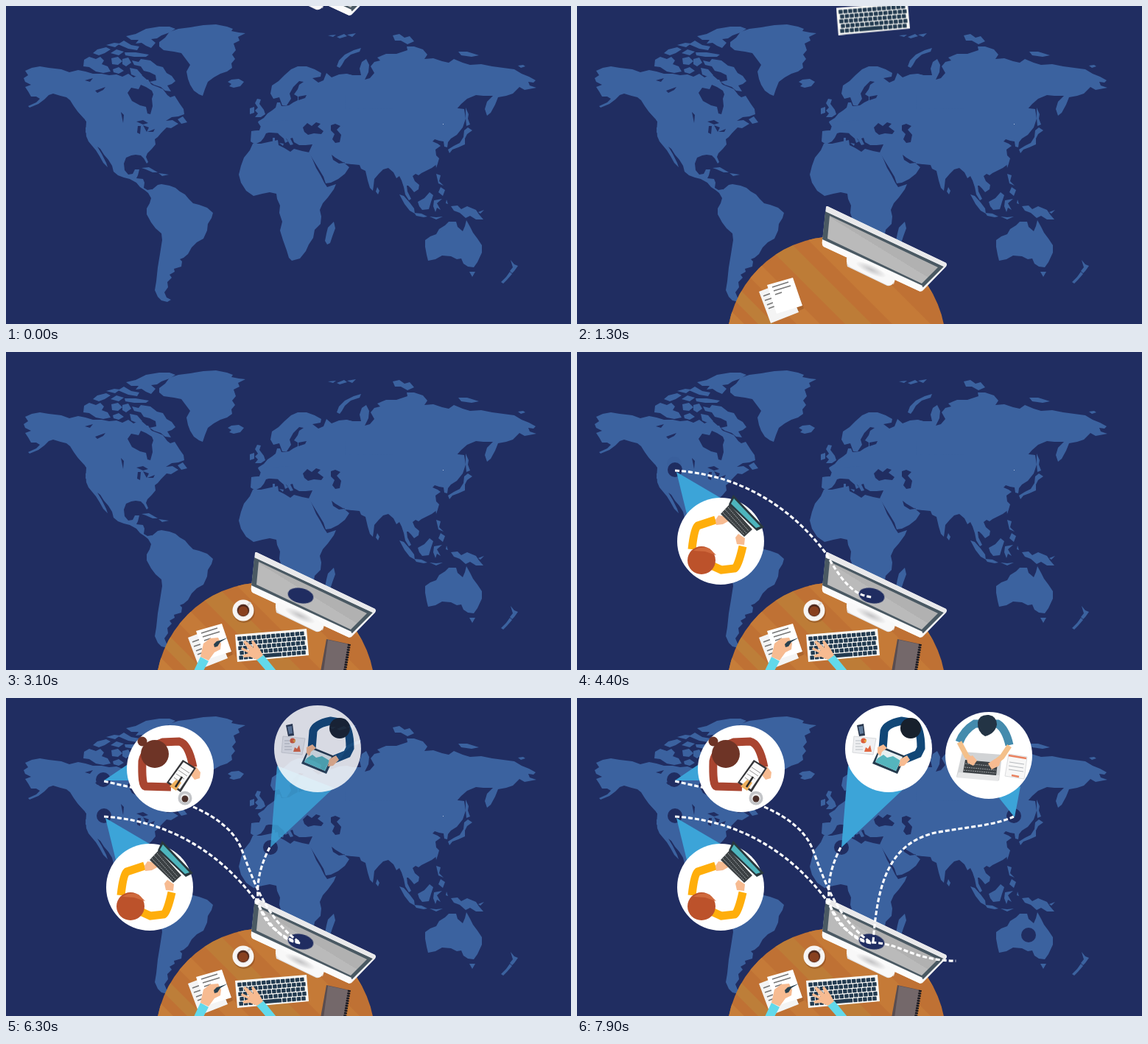
An HTML page that plays this animation: 767 px wide and 432 px high, repeating every 8 s.

```html
<!DOCTYPE html>
<html lang="en">
<head>
<meta charset="utf-8">
<title>Connected desks</title>
<style>
  html, body { margin: 0; width: 100%; height: 100%; overflow: hidden; background: #202d61; }
  svg { display: block; width: 767px; height: 432px; }
  .land { fill: #3b629f; }
  .sea, .marker { fill: #202d61; }
  .line { fill: none; stroke: #fff; stroke-width: 3.1; stroke-dasharray: 6 3; }
  .beam { fill: #3ca4d8; }
  .arm { fill: none; stroke-width: 11; }
  .skin { fill: #f7bb91; }
</style>
</head>
<body>
<svg viewBox="0 0 767 432" xmlns="http://www.w3.org/2000/svg">
  <defs>
    <clipPath id="deskClip"><circle cx="352" cy="462" r="149"/></clipPath>
    <linearGradient id="glass" x1="0" y1="1" x2="1" y2="0">
      <stop offset=".5" stop-color="#bababa"/><stop offset=".5" stop-color="#b1b1b1"/>
    </linearGradient>
    <radialGradient id="standShade">
      <stop offset="0" stop-color="#c4c4c6"/><stop offset="1" stop-color="#f6f6f6"/>
    </radialGradient>
  </defs>

  <g class="land">
    <!-- North America -->
    <path d="M24 98L30 94 26 88 35 84 46 82 58 84 75 86 86 90 98 87 108 89 118 92 130 92 140 94 150 93 158 96 166 92 173 97 183 93 190 99 198 107 206 110 213 113 219 121 223 124 229 122 236 133 241 140 242 147 234 150 225 151 217 156 226 155 234 160 224 166 218 165 211 172 108 172 109 157 103 150 97 143 92 136 87 128 82 124 74 122 64 119 58 121 52 127 44 133 32 138 30 136 41 131 46 126 41 123 34 123 30 116 26 110 34 107 26 103z"/>
    <path d="M108 165L214 165 211 172 206 178 202 181 203 188 198 194 192 200 190 205 193 212 191 214 187 207 183 203 176 202 170 203 163 206 160 214 161 223 166 229 172 228 175 222 181 222 179 230 177 234 186 235 188 240 187 247 192 250 198 249 201 253 197 254 193 254 188 250 182 246 177 240 168 235 160 233 152 230 146 225 144 217 139 209 133 202 128 194 124 191 130 201 136 213 138 219 132 213 127 204 122 196 117 190 112 184 109 177z"/>
    <!-- Arctic islands -->
    <path d="M106 73L113 69 122 72 128 69 133 74 130 79 138 82 142 89 132 91 122 89 113 83 105 82zM118 64L124 59 136 56 142 59 134 64 126 67zM143 71L152 69 158 75 152 80 144 79zM158 72L166 70 170 77 163 82 158 79zM145 86L153 83 160 88 153 92 146 90z"/>
    <path d="M163 41L176 38 190 31 208 28 222 28 230 31 222 36 211 40 205 44 197 45 203 50 197 57 190 54 184 50 176 51 180 46 170 46zM136 53L147 50 155 51 148 56zM142 64L150 59 160 62 153 67zM161 63L176 63 194 66 190 69 174 69 162 67zM152 52L160 47 170 53 181 55 178 60 166 58z"/>
    <path d="M171 74L180 76 183 72 196 74 205 81 213 83 218 91 225 95 230 102 225 106 219 108 224 116 216 115 210 110 201 107 195 103 204 101 203 94 195 90 187 88 183 82 174 80zM168 84L178 86 185 94 177 96 170 93zM184 100L193 100 196 105 188 108z"/>
    <!-- Greenland and Iceland -->
    <path d="M208 49L216 43 222 35 234 31 250 29 268 26 285 25 300 28 308 31 306 34 316 36 325 37 315 42 317 47 309 51 312 60 307 66 311 72 306 78 307 84 300 89 291 92 282 97 274 103 270 113 267 122 262 120 255 115 250 107 247 99 245 89 250 80 244 72 238 64 228 62 214 60 208 55zM301 103L306 100 316 99 323 103 318 109 309 111 303 109 306 106z"/>
    <!-- South America -->
    <path d="M200 248L206 243 211 242 222 244 230 247 236 252 243 256 248 262 254 268 262 270 273 274 281 281 279 288 274 296 273 305 268 316 259 321 252 328 247 337 241 342 236 344 239 347 238 354 228 357 229 361 222 365 225 369 219 375 220 382 215 389 218 396 224 399 219 402 211 400 206 395 202 386 204 374 206 355 209 337 212 318 211 309 203 302 197 294 191 283 191 275 195 268 197 261 193 254z"/>
    <!-- Africa and Madagascar -->
    <path d="M335 187L346 187 360 184 369 182 370 189 378 193 386 198 391 194 402 197 412 199 416 208 421 220 427 230 432 240 436 246 448 242 445 249 437 260 430 268 426 277 428 286 427 296 419 304 417 315 411 324 407 333 399 343 388 346 384 342 381 332 376 318 372 305 375 293 371 281 372 271 368 262 367 255 358 253 348 255 336 258 326 251 319 240 316 229 319 217 323 206 331 196zM445 293L447 302 443 313 440 322 436 324 433 319 435 309 437 301z"/>
    <!-- Europe -->
    <path d="M333 170L344 169 346 163 342 157 350 152 355 146 361 142 366 138 368 131 372 131 374 136 384 135 390 131 396 128 396 123 391 120 396 113 398 107 404 103 398 102 390 110 385 119 387 126 381 135 375 135 371 124 363 126 359 119 361 108 370 102 378 94 387 86 396 82 408 82 419 86 428 91 427 96 416 98 424 104 431 101 435 91 442 97 452 93 462 92 470 94 470 215 457 212 447 206 442 202 444 209 452 214 459 213 466 219 460 228 451 235 441 240 434 241 431 232 425 222 417 209 411 199 416 188 407 189 398 189 391 185 389 179 386 180 390 188 386 189 382 182 375 173 371 167 369 168 373 173z"/>
    <path d="M386 155L342 158 346 164 344 169 333 170 332 184 338 188 346 184 350 179 353 173 360 171 366 169 371 175 377 180 379 186 383 184 380 180 386 182zM341 126L346 127 344 133 350 141 352 147 346 151 338 151 342 146 338 142 342 138 338 132zM331 139L337 137 337 145 331 147zM362 179h3v7h-3zM371 186l6 1-1 3z"/>
    <!-- Asia -->
    <path d="M460 150L462 92 470 94 482 94 480 85 483 76 489 72 493 80 492 90 487 100 494 98 500 91 495 82 500 76 508 74 504 70 516 65 530 65 545 60 544 55 554 55 566 59 572 66 568 72 580 71 592 75 601 77 608 72 620 77 630 80 645 79 660 82 675 84 690 86 700 92 710 96 719 101 716 104 709 103 711 108 720 111 704 114 697 110 688 119 679 122 668 124 664 134 658 145 653 149 650 140 653 130 661 122 648 122 638 121 626 126 618 133 610 142z"/>
    <path d="M460 140L605 138 622 140 624 153 620 165 612 175 604 180 600 185 599 192 595 191 594 184 588 183 582 181 579 184 586 187 590 190 583 195 584 203 588 207 586 214 578 220 570 224 564 227 560 230 556 228 552 231 555 238 561 243 560 249 554 253 550 248 546 244 544 244 545 252 550 262 547 264 542 256 540 246 537 237 534 231 530 234 526 226 519 220 512 222 506 228 500 235 499 244 498 251 494 247 491 237 488 224 482 221 480 216 460 214z"/>
    <!-- Northern and eastern islands -->
    <path d="M449 82L452 74 460 66 472 60 482 57 480 62 468 66 460 73 456 80 453 84zM437 40l11-1-4 3zM449 42l10-4 4 3-10 3zM463 39l12-2-5 5zM525 40L534 38 541 43 548 41 554 48 545 52 536 47 528 47zM614 62L626 62 642 67 632 69 618 67zM695 81l7-1 3 2-6 2zM624 138L628 147 627 153 630 161 625 163 624 152zM622 169L627 165 633 169 626 174 623 180 623 188 614 192 606 195 602 200 600 195 608 190 616 186 621 178z"/>
    <path d="M504 246L507 251 505 256 502 252zM583 212l3 2-2 6zM584 228L590 230 588 238 594 244 587 241zM590 246L596 250 593 258 587 253zM534 256L540 258 548 267 554 275 555 282 548 278 541 269zM554 281L564 282 572 286 567 287 557 285zM575 286l9 1 9-1-9 4zM559 266L568 261 575 253 580 257 577 266 574 276 565 277 561 272zM581 264L592 262 585 268 590 277 585 274 583 280 580 272zM598 263l2 6-3-1zM604 272L613 271 618 276 626 272 638 277 642 283 648 290 638 290 630 285 624 288 616 281 608 278zM641 280l8-3-5 5z"/>
    <!-- Oceania and the Caribbean -->
    <path d="M569 318L576 313 584 310 588 303 596 298 601 293 611 293 613 300 620 306 623 299 625 291 630 300 634 308 640 316 646 325 646 335 640 348 635 355 627 354 621 350 618 343 612 344 604 340 592 339 583 344 573 346 571 338 569 327zM629 361L637 361 633 368zM685 345L690 351 695 353 690 360 687 363 684 360 688 355zM684 361L687 364 680 372 675 377 672 375 679 368zM184 220L194 219 206 226 199 226 190 222zM207 227L221 229 212 231zM233 154L240 150 246 158 238 160z"/>
  </g>
  <g class="sea">
    <path d="M165 118L170 111 180 113 183 107 190 110 198 115 200 120 198 126 199 136 196 147 192 146 190 137 182 135 171 129zM177 157L186 155 193 159 186 161zM179 163L183 163 182 174 178 172zM186 162L194 165 191 171zM192 171l10-4-2 4zM107 101l11-3-4 5zM121 115l14-5-3 4-8 4zM156 144l4 4-1 11z"/>
    <path d="M405 171L403 165 409 159 415 163 421 158 427 160 423 164 431 170 428 174 418 173 410 175zM441 162L447 160 454 163 449 168 455 175 453 185 447 186 443 181 446 174 441 169zM397 123l11-2-2 4-9 3zM98 145l9 9 1 5-7-6z"/>
  </g>
  <path fill="#b9c6e0" d="M593 160h1v1h-1z"/>

  <g id="desk">
    <circle cx="352" cy="462" r="149" fill="#bf7134"/>
    <g id="grain" clip-path="url(#deskClip)"></g>
  </g>

  <g id="monitor">
    <path fill="#f7f7f8" d="M338 273Q339 271 342 273L501 349Q503 351 501 354L470 386Q468 389 464 387L335 327Q332 325 333 320z"/>
    <path fill="#4a5963" d="M337 279L498 354 470 382 333 318z"/>
    <path fill="#e9e9eb" d="M338 273Q339 271 342 273L501 349 500 355 338 279z"/>
    <path fill="url(#glass)" d="M343 285L490 355 468 377 340 316z"/>
    <path fill="#fbfbfb" d="M333 317L469 380 466 388 335 327Q332 325 333 317z"/>
    <path fill="#e3e3e6" d="M366 349L367 354 421 380Q428 381 431 374L430 378z"/>
    <path fill="#f8f8f8" d="M366 345Q365 340 372 341L430 368Q434 372 429 377 425 381 419 378L372 355Q365 350 366 345z"/>
    <ellipse cx="399" cy="358" rx="22" ry="6" transform="rotate(25 399 358)" fill="url(#standShade)"/>
  </g>
  <ellipse id="hole" class="marker" cx="400" cy="331" rx="17.6" ry="10.3"/>

  <g id="papers">
    <path fill="#8c4c22" opacity=".45" d="M249 389L294 372 308 411 264 431z"/>
    <path fill="#f4f4f4" d="M247 388L284 374 301 416 263 431z"/>
    <path stroke="#777" stroke-width="1.6" d="M253 394l11-4M255 400l9-3M258 406l8-3M260 411l8-3"/>
    <path fill="#fff" d="M258 379L293 369 306 407 271 418z"/>
    <path stroke="#777" stroke-width="1.6" d="M265 382l22-7M267 387l23-7M269 392l9-3"/>
  </g>
  <g id="keyboard">
    <path fill="#f8f8f5" d="M311 384L408 376 411 412 314 421z"/>
    <g id="keys" fill="#233b50" transform="translate(313 386) rotate(-4.7)"></g>
  </g>
  <g id="hands">
    <path fill="#62d9eb" d="M255 433L264 414 275 420 268 433z"/>
    <path class="skin" d="M264 414L268 396 277 389 288 388 292 396 291 404 283 408 275 419z"/>
    <path fill="#28414f" d="M282 397l4-4 4-1 11-4-10 6-4 6-4 1z"/>
    <path fill="#62d9eb" d="M340 418L349 411 367 433 353 433z"/>
    <path class="skin" d="M341 418L331 414 323 415 321 412 329 409 319 404 320 401 331 406 322 394 325 392 336 402 333 393 336 392 344 403 349 412z"/>
  </g>
  <g id="notebook">
    <path fill="#594d50" d="M435 390L467 397 461 434 427 434z"/>
    <path fill="#74686a" d="M437 391L465 397 458 434 431 434z"/>
    <path stroke="#17171d" stroke-width="4" stroke-dasharray="2 1.4" d="M466 397L460 434"/>
  </g>
  <g id="coffee">
    <circle cx="323" cy="353" r="15" fill="#6f3817" opacity=".35"/>
    <circle cx="322" cy="351" r="14.5" fill="#f7f5f4"/>
    <path stroke="#dedad8" stroke-width="3" d="M326 346l6-6"/>
    <circle cx="322" cy="351" r="9.3" fill="#e1dcda"/>
    <circle cx="322" cy="351" r="8.2" fill="#50291d"/>
    <circle cx="322" cy="352" r="6.6" fill="#88401f"/>
  </g>

  <g id="markers"></g>
  <g id="beams"></g>
  <g id="lines"></g>

  <g class="bubble">
    <circle cx="195" cy="257" r="59" fill="#fff"/>
    <path class="arm" stroke="#ffae0b" d="M188 228L164 236Q159 240 156 268M176 287L196 296 214 294Q219 291 225 264"/>
    <path class="skin" d="M188 228l4-6 9 1 6 6-9 5-9 1zM217 261l-2-9 4-5 9 6-1 9z"/>
    <path fill="#3b4043" d="M207 207L238 241 227 251 195 220z"/>
    <path stroke="#a8adb0" stroke-dasharray="2 1" d="M205 211L233 243M201 214L230 246M198 218L227 248" fill="none"/>
    <path fill="#29383e" d="M212 194L254 238 244 243 206 207z"/>
    <path fill="#4db5bd" d="M213 199L249 237 243 239 209 206z"/>
    <circle cx="169" cy="283" r="19" fill="#bc522b"/>
    <path fill="#cf693d" d="M158 270q10-7 22-3l9 9-15-5z"/>
  </g>

  <g class="bubble">
    <circle cx="223" cy="96" r="59" fill="#fff"/>
    <path class="arm" stroke="#a94530" stroke-width="13" d="M224 121L189 120Q184 118 185 86 188 69 213 60L235 59Q248 62 254 94"/>
    <path class="skin" d="M249 96l9-3 6 8-1 8-7 2-7-9z"/>
    <path fill="#343539" d="M240 84L258 95 237 128 218 115z"/>
    <path fill="#fafafa" d="M241 87L255 96 236 124 221 114z"/>
    <path stroke="#999" d="M237 94l12 8M234 98l12 8M231 103l11 7M228 108l7 5"/>
    <path fill="#eeb05c" d="M222 120l9-9 7 4-7 11z"/>
    <path stroke="#292929" stroke-width="2.5" d="M230 121l9-14"/>
    <circle cx="202" cy="76" r="19" fill="#6e3426"/>
    <circle cx="185" cy="59" r="6.5" fill="#6e3426"/>
    <circle cx="243" cy="136" r="9.5" fill="#c3c5c8"/>
    <circle cx="243" cy="136" r="6" fill="#eee"/>
    <circle cx="243" cy="137" r="4.5" fill="#4b302a"/>
  </g>

  <g class="bubble">
    <circle cx="423" cy="69" r="59" fill="#fff"/>
    <path class="arm" stroke="#114777" d="M415 69L417 45Q420 35 441 31L458 34Q467 42 467 68L463 76 446 83"/>
    <path fill="#eff0f2" stroke="#d8dadd" d="M376 52L406 55 402 77 374 74z"/>
    <path stroke="#b8bdc2" d="M378 58h7M378 62h7M378 66h10M378 70h10"/>
    <circle cx="389" cy="58" r="3.6" fill="#da5b3b"/>
    <path fill="#e6a33c" d="M389 58l4-2-1 5z"/>
    <path fill="#e16842" d="M390 73l2-6 3 2 3-5 2 9z"/>
    <path fill="#29374d" d="M380 37l9-2 2 16-8 1z"/>
    <path fill="#607b9b" d="M382 39l6-1 1 10-5 1z"/>
    <path fill="#243a4d" d="M412 65L446 79 435 103 401 89z"/>
    <path fill="#e6f0f1" d="M412 68L442 80 433 99 405 87z"/>
    <path fill="#55b5bd" d="M408 82l8-5 5 4 8-2 10 6-6 14-28-12z"/>
    <path class="skin" d="M408 67l8-4 5 5-7 5-2 6-4-4zM439 83l9-5 4 6-8 8-7 1z"/>
    <circle cx="453" cy="41" r="14" fill="#17202c"/>
  </g>

  <g class="bubble">
    <circle cx="559" cy="78" r="59" fill="#fff"/>
    <path class="arm" stroke="#448bad" stroke-width="12" d="M519 60Q525 44 540 35L571 35Q582 42 587 64"/>
    <path fill="#d1d3d5" d="M523 73L577 77 573 112 515 107z"/>
    <path fill="#e6e7e8" d="M518 101L573 105 572 113 515 108z"/>
    <path fill="#3d4246" d="M527 84L571 88 569 105 524 101z"/>
    <path stroke="#9da1a4" stroke-dasharray="2 1" d="M527 89l43 4M526 94l43 4M525 98l43 4"/>
    <path fill="none" stroke="#f4c08a" stroke-width="7" d="M519 60L529 79 539 87M587 65L577 80 563 91"/>
    <path class="skin" d="M529 81l8-3 6 7-5 7-8-4zM576 81l-9 2-9 6 5 8 10-5z"/>
    <path fill="#f7f7f7" stroke="#dcdddf" d="M586 76L611 80 607 110 581 106z"/>
    <path stroke="#e98260" stroke-width="2.5" d="M586 78l24 4M590 105l10 2"/>
    <path stroke="#b5b9bd" d="M587 87l20 3M586 92l20 3M586 97l20 3"/>
    <path fill="#233445" d="M544 33Q546 22 559 23 570 25 570 36 568 48 554 52 543 46 544 33z"/>
  </g>
</svg>

<script>
const LOOP = 8000;
const $ = id => document.getElementById(id);
const fill = (id, html) => { $(id).innerHTML = html; };

// steps: [time, style]; the first and last styles hold to the loop's ends
function play(el, steps) {
  const all = [[0, steps[0][1]], ...steps, [LOOP, steps.at(-1)[1]]];
  el.animate(all.map(([t, style]) => ({ offset: Math.min(t / LOOP, 1), ...style })),
    { duration: LOOP, iterations: Infinity });
}
const at = (x, y) => ({ transform: `translate(${x}px,${y}px)` });
const slide = (id, start, end, x, y) => play($(id), [[start, at(x, y)], [end, at(0, 0)]]);
const fade = (el, start, end) => play(el, [[start, { opacity: 0 }], [end, { opacity: 1 }]]);
const rise = (el, start, end, tilt = '') => play(el, [
  [start, { opacity: 0, transform: `translateY(43px) ${tilt}` }],
  [end, { opacity: 1, transform: `translateY(0px) ${tilt}` }]
]);

// Wood bands run at 45 degrees; each is given by its x - y range.
const bands = [[-230, -205, '#c67d39'], [-186, -164, '#bd7e39'], [-134, -102, '#c57a38'],
  [-68, -32, '#bd7c37'], [-4, 48, '#c57a37'], [92, 118, '#c57a37']];
fill('grain', bands.map(([a, b, c]) =>
  `<path fill="${c}" d="M${a + 300} 300H${b + 300}L${b + 460} 460H${a + 460}z"/>`).join(''));

let keys = '';
for (let row = 0; row < 5; row++) {
  const shift = row % 2 * 1.5;
  for (let col = 0; col < 14; col++) {
    if (row === 4 && col > 3 && col < 8) continue;
    keys += `<rect x="${(1 + shift + col * 6.55).toFixed(1)}" y="${row * 6.5 + 1}" width="5.5" height="5.3" rx=".7"/>`;
  }
}
fill('keys', keys + '<rect x="27" y="27" width="27" height="5.3" rx=".7"/>');

slide('desk', 60, 360, 0, 125);
slide('monitor', 350, 840, 0, -375);
slide('papers', 960, 1280, -310, 0);
slide('keyboard', 1270, 1600, 45, -421);
slide('hands', 1750, 2000, 0, 65);
slide('notebook', 1980, 2500, 342, 0);
slide('coffee', 2400, 2800, 312, -378);
$('hole').style.transformOrigin = '400px 331px';
rise($('hole'), 2830, 3080, 'rotate(12deg)');

// dir: 1 if the path begins at the screen, -1 if it ends there
const links = [
  { spot: [133, 160], dir: -1, mark: 3180, draw: 3480, show: 3860,
    beam: 'M135 163L149 220 198 200z',
    line: 'M133 161C215 166 285 205 336 271C352 296 368 330 400 333' },
  { spot: [132, 111], dir: -1, mark: 4390, draw: 4640, show: 4960,
    beam: 'M133 112L167 89 168 112z',
    line: 'M133 113C190 126 298 146 320 206C335 245 352 300 400 333' },
  { spot: [359, 203], dir: -1, mark: 5380, draw: 5660, show: 6060,
    beam: 'M359 203L368 92 445 122z',
    line: 'M358 203C348 222 340 245 342 272C346 305 372 325 400 333' },
  { spot: [593, 160], dir: 1, mark: 6420, draw: 6700, show: 7160,
    beam: 'M594 162L570 132 602 120z',
    line: 'M402 331C408 250 424 198 486 183C530 175 568 173 593 161' },
  { spot: [613, 322], dir: 1, mark: 7480, draw: 7790,
    line: 'M400 332C420 333 433 338 448 344C505 367 570 360 613 322' }
];

fill('markers', links.map(({ spot: [x, y] }) =>
  `<circle class="marker" cx="${x}" cy="${y}" r="10"/>`).join(''));
fill('beams', links.filter(l => l.beam).map(l => `<path class="beam" d="${l.beam}"/>`).join(''));
fill('lines', links.map((l, i) => `
  <mask id="wipe${i}" maskUnits="userSpaceOnUse" x="0" y="0" width="767" height="432">
    <path d="${l.line}" pathLength="1" fill="none" stroke="#fff" stroke-width="8" stroke-dasharray="1 2"/>
  </mask>
  <path class="line" d="${l.line}" mask="url(#wipe${i})"/>`).join(''));

const bubbles = document.querySelectorAll('.bubble');
links.forEach((l, i) => {
  rise($('markers').children[i], l.mark, l.mark + 250);
  play($('wipe' + i).firstElementChild, [
    [l.draw, { strokeDashoffset: 1.01 * l.dir }],
    [l.draw + (i === 4 ? 480 : 380), { strokeDashoffset: 0 }]
  ]);
  if (!l.beam) return;
  for (const el of [$('beams').children[i], bubbles[i]]) fade(el, l.show, l.show + 290);
});
</script>
</body>
</html>
```
